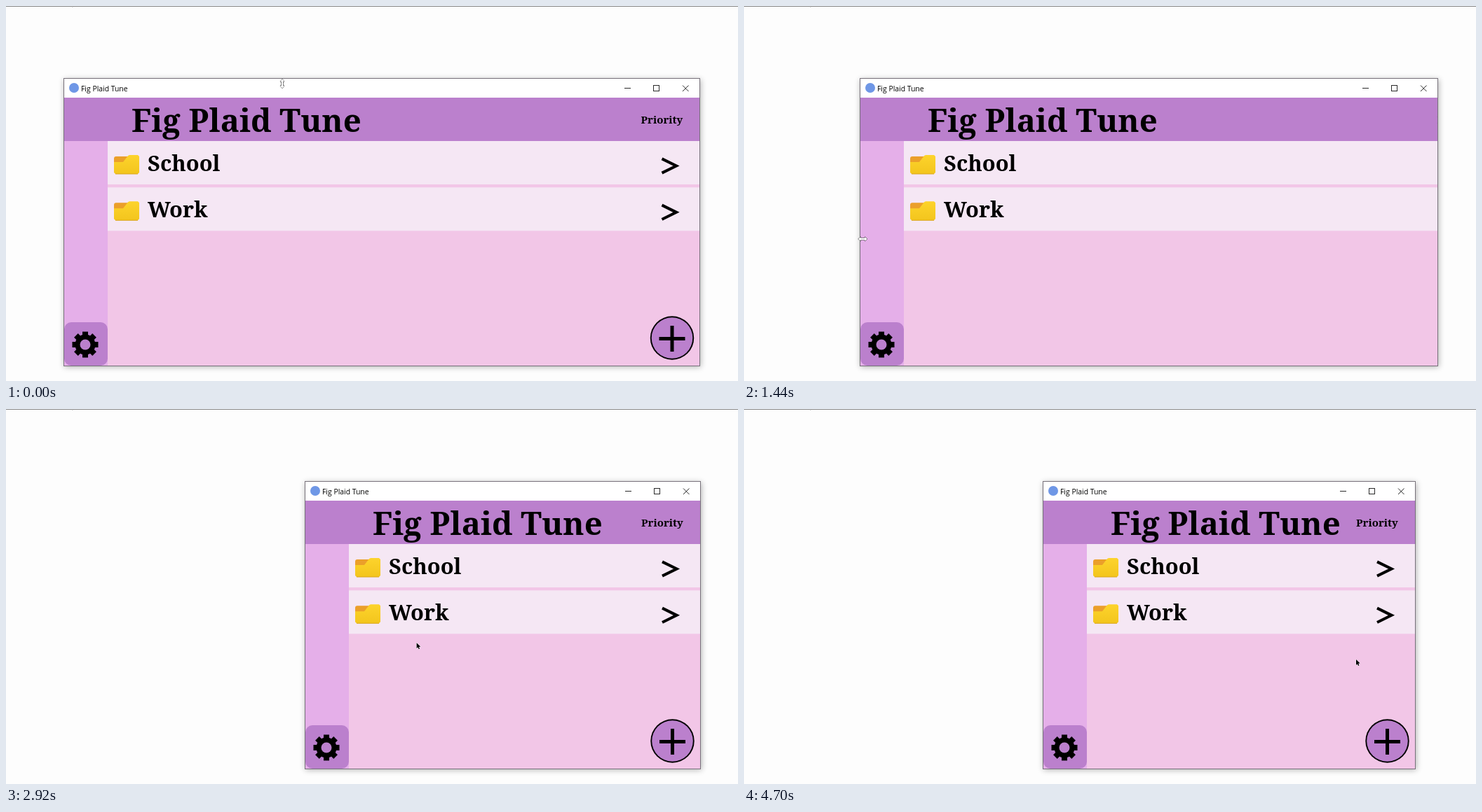
These frames come from a looping animation (1044 by 536 pixels, 5350 ms). An HTML page with a canvas:

```html
<!DOCTYPE html>
<html lang="en">
<head>
<meta charset="utf-8">
<title>Fig Plaid Tune</title>
<style>
  html, body { margin: 0; height: 100%; overflow: hidden; background: #fdfdfd; }
  canvas { display: block; }
</style>
</head>
<body>
<canvas id="stage" width="1044" height="536"></canvas>
<script>
const ctx = document.getElementById('stage').getContext('2d');
const LOOP = 5350, TOP = 104, BOTTOM = 514, LAYOUT_WIDTH = 908;
const NAME = 'Fig Plaid Tune';
const PURPLE = '#bb80cd', SERIF = '"Noto Serif", serif';

// [time, position]
const leftEdge = [[0, 82], [1000, 82], [1060, 83], [1200, 104], [1440, 165], [1880, 314],
  [1990, 328], [2050, 342], [2320, 408], [2560, 422], [2600, 426]];
const rightEdge = [[0, 990], [1000, 990], [1060, 991], [1150, 990], [2000, 990], [2320, 991],
  [3840, 991], [3900, 990], [4350, 957.5]];
// [time, x, y, shape until the next key]
const pointer = [[0, 394, 111, 'v'], [60, 394, 111, 'arrow'], [180, 270, 180, 'arrow'],
  [380, 18, 300, 'arrow'], [460, 70, 322, 'h'], [510, 81, 326, 'h'], [690, 81, 326, 'h'],
  [750, 81, 330, 'h'], [1060, 81, 330, 'h'], [1200, 107, 331, 'h'], [1440, 169, 333, 'h'],
  [1880, 318, 326, 'h'], [1990, 332, 325, 'h'], [2320, 413, 320, 'h'], [2600, 430, 319, 'h'],
  [2780, 430, 319, 'arrow'], [3300, 1004, 375, 'arrow'], [3500, 991, 352, 'h'],
  [3660, 991, 349, 'h'], [3840, 991, 349, 'h'], [4350, 958, 349, 'h'],
  [4380, 955, 349, 'arrow'], [4700, 873, 358, 'arrow']];

function at(keys, t, column = 1) {
  const next = keys.findIndex(k => k[0] > t);
  if (next < 0) return keys[keys.length - 1][column];
  const a = keys[next - 1], b = keys[next];
  return a[column] + (b[column] - a[column]) * (t - a[0]) / (b[0] - a[0]);
}

function rect(x, y, w, h, color) {
  ctx.fillStyle = color;
  ctx.fillRect(x, y, w, h);
}

function text(s, x, y, font) {
  ctx.font = font;
  ctx.fillStyle = '#000';
  ctx.fillText(s, x, y);
}

function trace(points, close) {
  ctx.beginPath();
  points.forEach(([x, y]) => ctx.lineTo(x, y));
  if (close) ctx.closePath();
}

function line(points, width, color = '#000') {
  trace(points);
  ctx.strokeStyle = color;
  ctx.lineWidth = width;
  ctx.stroke();
}

function disc(x, y, r, color) {
  ctx.beginPath();
  ctx.arc(x, y, r, 0, 7);
  ctx.fillStyle = color;
  ctx.fill();
}

function rounded(x, y, w, h, r, color) {
  ctx.beginPath();
  ctx.roundRect(x, y, w, h, r);
  ctx.fillStyle = color;
  ctx.fill();
}

function folder(x, y) {
  rounded(x, y + 2, 30, 20, 3, '#eb9f2a');
  const gold = ctx.createLinearGradient(0, y, 0, y + 27);
  gold.addColorStop(0, '#fdd32c');
  gold.addColorStop(1, '#f3c51d');
  ctx.fillStyle = gold;
  trace([[x, y + 10], [x + 13, y + 10], [x + 20, y + 1], [x + 22, y], [x + 34, y],
    [x + 36, y + 2], [x + 36, y + 25], [x + 34, y + 27], [x + 2, y + 27], [x, y + 25]], true);
  ctx.fill();
  rect(x + 2, y + 26.5, 32, 1, '#d9a51b');
}

function gear(x, y) {
  ctx.save();
  ctx.translate(x, y);
  disc(0, 0, 14.5, '#000');
  for (let i = 0; i < 8; i++) {
    rect(-4, -18.5, 8, 8, '#000');
    ctx.rotate(Math.PI / 4);
  }
  disc(0, 0, 7.5, PURPLE);
  ctx.restore();
}

function titleBar(left, right) {
  rect(left, TOP, right - left, 27, '#fff');
  disc(left + 15, 117, 7, '#6f97e6');
  text(NAME, left + 25, 122, '10.4px "Open Sans", sans-serif');
  const x = right - 990, ink = '#2a2a2a';
  line([[x + 882, 117.5], [x + 891, 117.5]], 1, ink);
  ctx.strokeRect(x + 923.5, 113.5, 8, 8);
  line([[x + 965, 113.5], [x + 973.5, 122]], 1, ink);
  line([[x + 965, 122], [x + 973.5, 113.5]], 1, ink);
}

function content(left, right, anchor) {
  rect(left, 131, right - left, 384, '#f2c6e7');
  rect(left, 131, right - left, 62, PURPLE);
  rect(left, 193, 63, 322, '#e5afe9');
  rounded(left + 1, 452, 62, 62, 10, PURPLE);
  gear(left + 31, 484);
  text(NAME, left + 97, 180, `bold 45.5px ${SERIF}`);
  text('Priority', anchor - 84.5, 168, `bold 15px ${SERIF}`);
  ['School', 'Work'].forEach((label, i) => {
    const y = 193 + i * 66.3;
    rect(left + 63, y, right - left - 63, 62, '#f5e7f4');
    folder(left + 72, y + 20);
    text(label, left + 120, y + 43, `bold 30.8px ${SERIF}`);
    line([[anchor - 54.5, y + 25.3], [anchor - 34, y + 35.5], [anchor - 54.5, y + 45.7]], 4.1);
  });
  const x = anchor - 40;
  disc(x, 474.5, 31.2, '#000');
  disc(x, 474.5, 29.3, PURPLE);
  rect(x - 18.5, 473, 37, 5, '#000');
  rect(x - 2.5, 457, 5, 37, '#000');
}

function drawPointer(x, y, shape) {
  ctx.save();
  ctx.translate(x, y);
  ctx.lineWidth = 1;
  if (shape === 'arrow') {
    trace([[0, 0], [0, 8], [1.8, 6.4], [3, 9], [4.4, 8.4], [3.2, 5.8], [5.6, 5.6]], true);
    ctx.fillStyle = '#000';
    ctx.strokeStyle = '#fff';
  } else {
    if (shape === 'v') ctx.rotate(Math.PI / 2);
    trace([[-6.5, 0], [-3, -3], [-3, -1.2], [3, -1.2], [3, -3], [6.5, 0],
      [3, 3], [3, 1.2], [-3, 1.2], [-3, 3]], true);
    ctx.fillStyle = '#fff';
    ctx.strokeStyle = '#222';
  }
  ctx.stroke();
  ctx.fill();
  ctx.restore();
}

function draw(t) {
  const left = Math.round(at(leftEdge, t)), right = Math.round(at(rightEdge, t));
  // Right-aligned items keep their old place until the edge is released.
  const anchor = t < 2600 ? left + LAYOUT_WIDTH : t < 4380 ? 990.5 : 957.5;
  const width = right - left, height = BOTTOM - TOP + 1;

  rect(0, 0, 1044, 536, '#fdfdfd');
  rect(0, 0, 1044, 1, '#868686');
  rect(94, 0, 1, 2, '#b0b0b0');

  ctx.save();
  ctx.shadowColor = 'rgba(0,0,0,.3)';
  ctx.shadowBlur = 8;
  ctx.shadowOffsetX = ctx.shadowOffsetY = 1;
  rect(left, TOP, width, height, '#fff');
  ctx.restore();

  ctx.save();
  ctx.beginPath();
  ctx.rect(left, TOP, width, height);
  ctx.clip();
  titleBar(left, right);
  content(left, right, anchor);
  ctx.restore();
  ctx.strokeStyle = '#77717a';
  ctx.lineWidth = 1;
  ctx.strokeRect(left + .5, TOP - .5, width - 1, height);

  const shape = pointer.filter(k => k[0] <= t).pop()[3];
  drawPointer(at(pointer, t, 1), at(pointer, t, 2), shape);
}

const start = performance.now();
function tick() {
  draw((performance.now() - start) % LOOP);
  requestAnimationFrame(tick);
}
tick();
</script>
</body>
</html>
```
